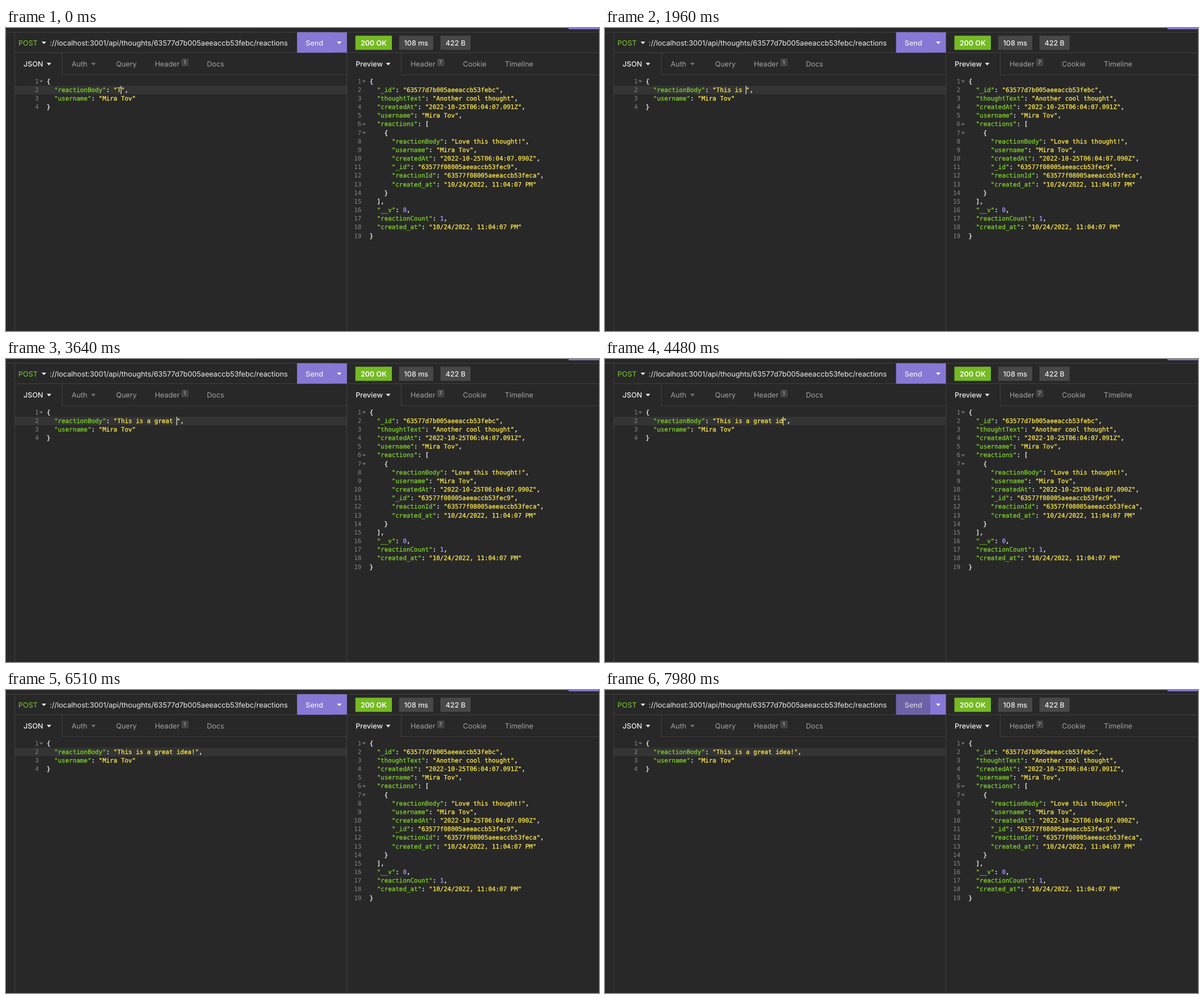
An HTML page that plays this animation: 1048 by 535 pixels, repeating every 8 s.

```html
<!DOCTYPE html>
<html lang="en">
<head>
<meta charset="utf-8">
<title>API client</title>
<style>
  html, body { margin: 0; width: 100%; height: 100%; overflow: hidden; background: #282828; }
  svg { display: block; width: 1048px; height: 535px; }
  text { font: 12.6px Inter, sans-serif; fill: #eee; white-space: pre; text-rendering: geometricPrecision; }
  .medium { font-weight: 500; }
  .bold { font-weight: 600; fill: #fff; }
  .dim { fill: #a3a3a3; }
  .url { font-size: 12.68px; text-anchor: end; }
  .badge { font-size: 9.5px; text-anchor: middle; fill: #b5b5b5; }
  .middle { text-anchor: middle; }
  .code { font: 10.9px "DejaVu Sans Mono", monospace; fill: #f8f8f8; stroke-width: .3px; }
  .number { fill: #858585; text-anchor: end; }
  .key, .post { fill: #7ecf2b; }
  .key { stroke: #7ecf2b; }
  .string { fill: #fbe64a; stroke: #fbe64a; }
  .value { fill: #a896ff; stroke: #a896ff; }
  .mark { stroke: #f8f8f8; }
</style>
</head>
<body>
<svg id="stage" viewBox="0 0 1048 535">
  <clipPath id="urlClip"><rect x="77" y="10" width="430" height="32"/></clipPath>
</svg>
<script>
const stage = document.getElementById('stage');
const LOOP = 8000, CHAR = 10.9 * 0.602, PITCH = 15.17;

function add(tag, attributes, content = '') {
  const node = document.createElementNS(stage.namespaceURI, tag);
  for (const name in attributes) node.setAttribute(name, attributes[name]);
  node.textContent = content;
  return stage.appendChild(node);
}
const rect = (x, y, width, height, fill, rx = 0) => add('rect', { x, y, width, height, fill, rx });
const label = (x, y, content, style = '') => add('text', { x, y, class: style }, content);
const caret = (x, y, fill = '#eee', half = 4) =>
  add('path', { d: `M${x - half} ${y - 2}h${2 * half}l${-half} ${half + .4}z`, fill });

function tokenStyle(token, line) {
  if (token[0] === '"') return line.includes(token + ':') ? 'key' : 'string';
  return /\d/.test(token) ? 'value' : 'mark';
}

// Splits a line of JSON into coloured spans.
function paintLine(node, line) {
  node.textContent = '';
  for (const [token] of line.matchAll(/"[^"]*"|\d+|[^"\d]+/g)) {
    const span = document.createElementNS(stage.namespaceURI, 'tspan');
    span.setAttribute('class', tokenStyle(token, line));
    span.textContent = token;
    node.append(span);
  }
}

function editor(x, lines, folds) {
  return lines.map((line, i) => {
    const y = 97.6 + i * PITCH;
    label(x - 14.3, y, i + 1, 'code number');
    if (folds.includes(i + 1)) caret(x - 9.7, y - 3, '#6c6c6c', 3.5);
    const node = label(x, y, '', 'code');
    paintLine(node, line);
    return node;
  });
}

// Frame lines and the top edge
const BORDER = '#404040';
rect(306, 0, 142, 1, '#303030');
rect(994, 0, 54, 2.2, '#8776d5', 1);
rect(0, 7, 1048, 1, BORDER);
rect(15, 8, 1, 527, BORDER);
rect(602, 8, 1, 527, BORDER);
rect(16, 43, 1032, 1, BORDER);
for (const [left, right] of [[99, 602], [698, 1048]]) {
  rect(left, 43, 1, 40, BORDER);
  rect(left, 82, right - left, 1, BORDER);
}

// Request bar
label(22, 30.6, 'POST', 'post');
caret(67, 26);
label(498, 30.6, 'http://localhost:3001/api/thoughts/63577d7b005aeeaccb53febc/reactions', 'url')
  .setAttribute('clip-path', 'url(#urlClip)');
const PURPLE = '#8878d6';
rect(514.6, 7.6, 87.8, 35.8, PURPLE);
const sendButton = rect(514.6, 7.6, 60.4, 35.8, PURPLE);
const sendLabel = label(545, 30.6, 'Send', 'medium middle');
caret(589, 26, '#fff');

// Response status
const status = (x, width, fill, content, style) => {
  rect(x, 13.6, width, 25, fill);
  label(x + width / 2, 30.6, content, style + ' middle');
};
status(617.5, 64.5, '#75ba24', '200 OK', 'bold');
status(694.7, 60.3, '#484848', '108 ms', 'medium');
status(767.7, 53.3, '#484848', '422 B', 'medium');

// Tabs
label(31, 68, 'JSON', 'medium');
caret(76, 63.5);
caret(154.5, 63.5, '#777');
label(618, 68, 'Preview', 'medium');
caret(675.5, 63.5);
const tabs = { Auth: [116], Query: [194.5], Header: [263, 715], Docs: [355], Cookie: [807.5], Timeline: [881.5] };
for (const name in tabs) for (const x of tabs[name]) label(x, 68, name, 'dim');
for (const [x, count] of [[316, 1], [768, 7]]) {
  rect(x - 6, 54, 12.5, 13.5, '#444', 2);
  label(x, 64.2, count, 'badge');
}

// Editors
rect(16, 102, 586, 15, '#343434');
const bodyLine = typed => `  "reactionBody": "${typed}",`;
const typedLine = editor(72, ['{', bodyLine('T'), '  "username": "Mira Tov"', '}'], [1])[1];
editor(642.4, `{
  "_id": "63577d7b005aeeaccb53febc",
  "thoughtText": "Another cool thought",
  "createdAt": "2022-10-25T06:04:07.091Z",
  "username": "Mira Tov",
  "reactions": [
    {
      "reactionBody": "Love this thought!",
      "username": "Mira Tov",
      "createdAt": "2022-10-25T06:04:07.090Z",
      "_id": "63577f08005aeeaccb53fec9",
      "reactionId": "63577f08005aeeaccb53feca",
      "created_at": "10/24/2022, 11:04:07 PM"
    }
  ],
  "__v": 0,
  "reactionCount": 1,
  "created_at": "10/24/2022, 11:04:07 PM"
}`.split('\n'), [1, 6, 7]);
const cursor = rect(0, 102, 1.2, 15, '#e8e8e8');

// One key press time per character
const MESSAGE = 'This is a great idea!';
const PRESSES = [0, 140, 280, 490, 840, 1470, 1680, 1820, 2030, 2240, 2450, 2730,
  2940, 3080, 3220, 3570, 4130, 4410, 4620, 4900, 5950];
const HOVER_START = 7630, BLINK = 530;
let shown = 0;

function draw() {
  const time = performance.now() % LOOP;
  const count = PRESSES.filter(press => press <= time).length;
  if (count !== shown) {
    paintLine(typedLine, bodyLine(MESSAGE.slice(0, count)));
    cursor.setAttribute('x', 72 + (19 + count) * CHAR - 0.5);
    shown = count;
  }
  const idle = time - PRESSES[count - 1];
  const hover = time >= HOVER_START;
  const blinkedOff = Math.floor(idle / BLINK) % 2 === 1;
  cursor.setAttribute('opacity', blinkedOff || hover ? 0 : 1);
  sendButton.setAttribute('fill', hover ? '#6d62a6' : PURPLE);
  sendLabel.setAttribute('opacity', hover ? 0.8 : 1);
  requestAnimationFrame(draw);
}
draw();
</script>
</body>
</html>
```
